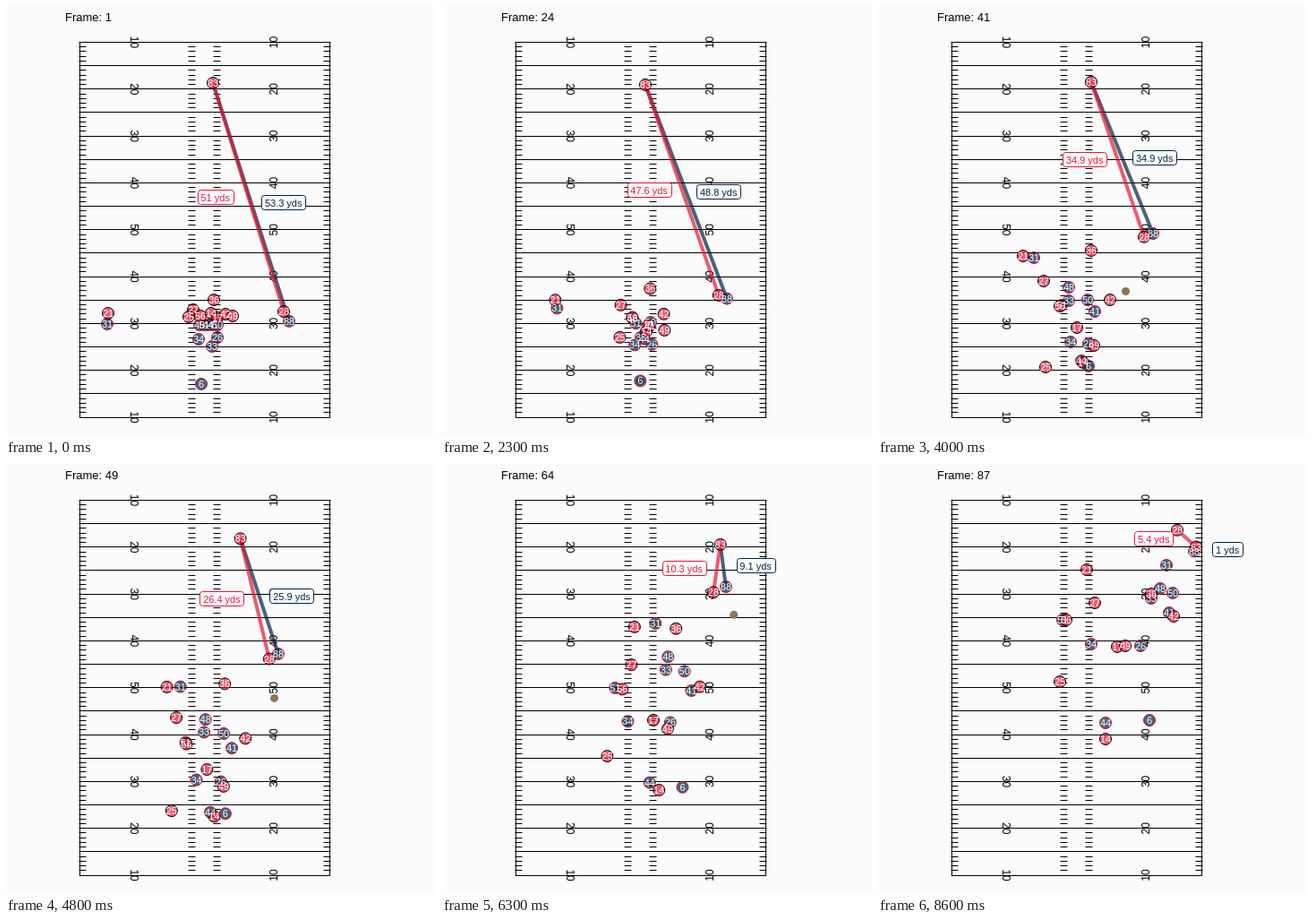
An HTML page with a canvas for the animation above (8700 ms loop, 480 by 480 pixels).

```html
<!DOCTYPE html>
<html lang="en">
<head>
<meta charset="utf-8">
<title>Play tracking</title>
<style>
  html, body { margin: 0; width: 100%; height: 100%; overflow: hidden; background: #fcfcfc; }
  canvas { display: block; }
</style>
</head>
<body>
<canvas id="stage" width="480" height="480"></canvas>
<script>
const ctx = document.getElementById('stage').getContext('2d');
const FONT = '"Liberation Sans", Arial, sans-serif';
const STEP = 100, STEPS = 87;
const LEFT = 82, RIGHT = 361, TOP = 40, LINE = 26.16, YARD = LINE / 5;
const RED = { fill: 'rgba(227,24,55,.7)', edge: '#000', label: '#e31837' };
const NAVY = { fill: 'rgba(0,34,68,.7)', edge: '#c60c30', label: '#002244' };

// Steps at which the play turns: snap, catch by the passer, throw, last step.
const SNAP = 11, PASSER = 17, THROW = 31, END = 86;
const COARSE = [SNAP, 40, 71, END];
const FINE = [SNAP, THROW, 40, 55, 71, END];

// Smooth curve through (times, values); launch scales the starting speed.
function curve(times, values, launch) {
  const last = times.length - 1;
  const span = i => times[i + 1] - times[i];
  const slope = i => (values[i + 1] - values[i]) / span(i);
  const tangent = times.map((_, i) => {
    if (i === 0) return slope(0) * launch;
    if (i === last) return slope(last - 1);
    return (slope(i - 1) * span(i) + slope(i) * span(i - 1)) / (span(i - 1) + span(i));
  });
  return step => {
    const t = Math.max(step, times[0]);
    let i = 0;
    while (i < last - 1 && t >= times[i + 1]) i++;
    const h = span(i), u = (t - times[i]) / h, v = 1 - u;
    return values[i] * v * v * (1 + 2 * u) + values[i + 1] * u * u * (3 - 2 * u)
      + h * u * v * (tangent[i] * v - tangent[i + 1] * u);
  };
}

function path(times, points, launch = 0) {
  const [x, y] = [0, 1].map(axis => curve(times, points.map(p => p[axis]), launch));
  return t => ({ x: x(t), y: y(t) });
}

const players = [];
function player(team, number, ...points) {
  const times = points.length === FINE.length ? FINE : COARSE;
  const p = { team, number, at: path(times, points) };
  players.push(p);
  return p;
}
const lineman = i => [216 + 5 * i, 356];

const receiver = player(NAVY, 88, [316, 351.8], [316, 295], [307, 254], [306, 175.5], [331, 108], [353, 97.5]);
player(NAVY, 31, [113, 355], [174, 281], [265, 148], [322, 113]);
player(NAVY, 48, lineman(0), [213, 314], [272, 183], [315, 139]);
player(NAVY, 51, lineman(1), [205, 334], [194, 220], [206, 174]);
player(NAVY, 44, lineman(2), [227, 396], [237, 334], [254, 289]);
player(NAVY, 41, lineman(3), [242, 341], [294, 220], [325, 166]);
player(NAVY, 50, lineman(4), [234, 328], [289, 197], [329, 144]);
player(NAVY, 34, [215, 372], [215, 375], [212, 254], [238, 201]);
player(NAVY, 26, [236, 370], [235, 377], [266, 255], [293, 203]);
player(NAVY, 33, [230, 380], [213, 329], [268, 197], [305, 150]);
player(RED, 21, [114, 343], [162, 279], [227, 153], [233, 118]);
player(RED, 36, [232, 328], [238, 273], [274, 161], [305, 145]);
player(RED, 27, [209, 339], [185, 307], [223, 196], [242, 155]);
player(RED, 25, [204, 347], [187, 403], [188, 294], [203, 243]);
player(RED, 56, [217, 346], [203, 335], [203, 221], [210, 174]);
player(RED, 14, [229, 343], [229, 398], [247, 345], [254, 307]);
player(RED, 17, [236, 348], [222, 359], [245, 256], [267, 204]);
player(RED, 42, [245, 344], [259, 328], [301, 219], [330, 170]);
player(RED, 49, [253, 346], [241, 379], [259, 261], [276, 203]);
const defender = player(RED, 28, [310, 341], [305, 296.8], [297, 257.7], [295, 182], [314, 110], [334, 73.7]);
const safety = player(RED, 83, [231, 86], [228, 88], [238, 84.8], [286, 84], [332, 95.5], [355, 92.5]);
const passer = player(NAVY, 6, [218, 422], [235, 402], [281, 339], [303, 286]);

const snap = path([SNAP - 1, PASSER], [[222, 354], [220, 421]], 1);
const flight = path([THROW, 40, 55, 71, END], [[225, 407], [276.5, 318.5], [311.5, 219.5], [337.5, 126.5], [354, 95]], 1);
const ball = t => (t < PASSER ? snap : t <= THROW ? passer.at : flight)(t);

function write(text, x, y, size, color, align = 'center') {
  ctx.font = `${size}px ${FONT}`;
  ctx.textAlign = align;
  ctx.fillStyle = color;
  ctx.fillText(text, x, y);
}

function rule(x, y, width) {
  ctx.fillRect(x, Math.round(y), width, 1);
}

function sideNumber(text, x, y, angle) {
  ctx.save();
  ctx.translate(x, y);
  ctx.rotate(angle);
  write(text, 0, 4, 12, '#000');
  ctx.restore();
}

function drawField() {
  const width = RIGHT - LEFT + 1, height = Math.round(16 * LINE) + 1;
  ctx.fillStyle = '#000';
  for (let i = 0; i <= 16; i++) rule(LEFT, TOP + i * LINE, width);
  for (let i = 0; i < 80; i++) {
    for (const center of [LEFT + 3, 207, 235, RIGHT - 3]) rule(center - 3.5, TOP + i * YARD, 8);
  }
  ctx.fillRect(LEFT, TOP, 1, height);
  ctx.fillRect(RIGHT, TOP, 1, height);
  for (let i = 0; i <= 8; i++) {
    const yards = 50 - 10 * Math.abs(4 - i), y = TOP + 0.5 + 2 * i * LINE;
    sideNumber(yards, 142.5, y, Math.PI / 2);
    sideNumber(yards, 299, y, -Math.PI / 2);
  }
}

function drawLink(a, b, team) {
  ctx.strokeStyle = team.fill;
  ctx.lineWidth = 4;
  ctx.beginPath();
  ctx.moveTo(a.x, a.y);
  ctx.lineTo(b.x, b.y);
  ctx.stroke();
}

function drawDistance(a, b, team, shift) {
  const yards = Math.round(Math.hypot(a.x - b.x, a.y - b.y) / YARD * 10) / 10;
  const text = `${yards} yds`;
  ctx.font = `11px ${FONT}`;
  const x = (a.x + b.x) / 2 + shift, y = Math.round((a.y + b.y) / 2 - 0.2);
  const width = Math.round(ctx.measureText(text).width + 7.5);
  ctx.beginPath();
  ctx.roundRect(Math.round(x - width / 2) + 0.5, y - 7.5, width, 16, 3);
  ctx.fillStyle = '#fff';
  ctx.fill();
  ctx.strokeStyle = team.label;
  ctx.lineWidth = 1;
  ctx.stroke();
  write(text, x, y + 5, 11, team.label);
}

function disc({ x, y }, radius, fill, edge) {
  ctx.beginPath();
  ctx.arc(x, y, radius, 0, 2 * Math.PI);
  ctx.fillStyle = fill;
  ctx.fill();
  if (!edge) return;
  ctx.strokeStyle = edge;
  ctx.lineWidth = 1;
  ctx.stroke();
}

function draw(step) {
  ctx.fillStyle = '#fcfcfc';
  ctx.fillRect(0, 0, 480, 480);
  write(`Frame: ${step + 1}`, 66, 17, 13, '#000', 'left');
  drawField();

  const deep = safety.at(step), links = [[receiver, 36.2], [defender, -36.8]];
  for (const [p] of links) drawLink(deep, p.at(step), p.team);
  disc(ball(step), 4.5, '#8f7558');
  for (const p of players) disc(p.at(step), 6.5, p.team.fill, p.team.edge);
  for (const p of players) {
    const { x, y } = p.at(step);
    write(p.number, x, y + 4, 11, '#fff');
  }
  for (const [p, shift] of links) drawDistance(deep, p.at(step), p.team, shift);
}

const start = performance.now();
function tick() {
  draw(Math.floor((performance.now() - start) / STEP) % STEPS);
  requestAnimationFrame(tick);
}
tick();
</script>
</body>
</html>
```
